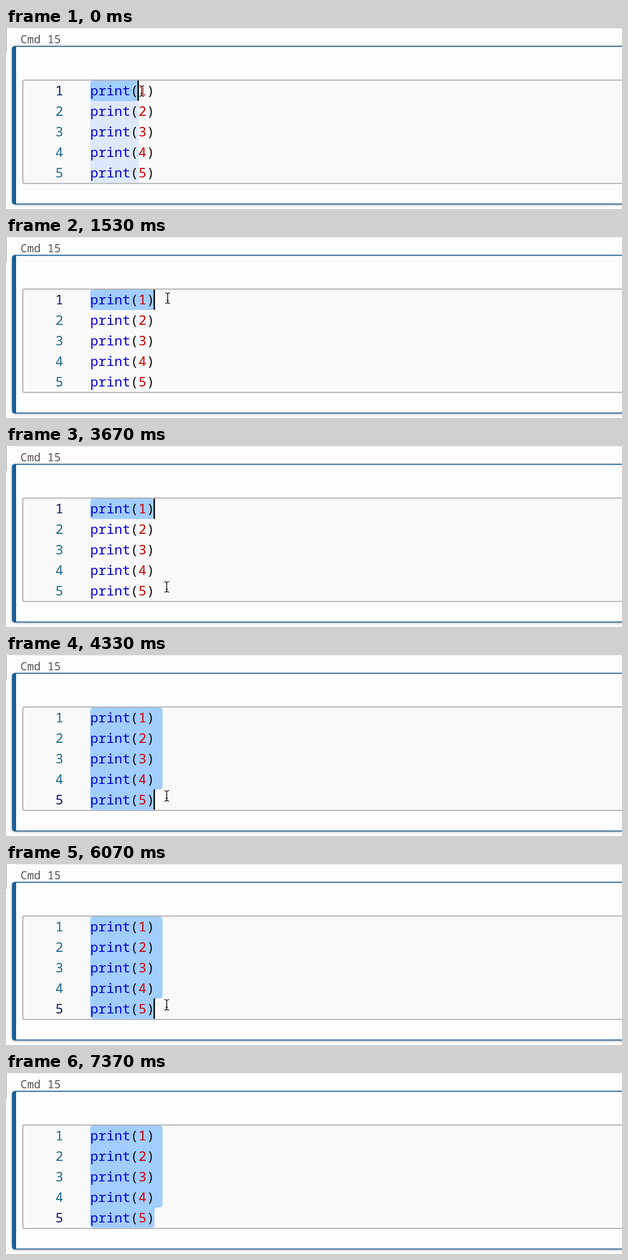
Write an HTML page with a canvas that moves like this. It is 1280 px wide and 379 px high and loops after 7410 ms.

```html
<!DOCTYPE html>
<html lang="en">
<head>
<meta charset="utf-8">
<title>Toggling comments in a notebook cell</title>
<style>
  html, body { margin: 0; width: 100%; height: 100%; overflow: hidden; background: #fdfdfd; }
  canvas { display: block; width: 1280px; height: 379px; }
</style>
</head>
<body>
<canvas id="stage" width="1280" height="379"></canvas>
<script>
const ctx = document.getElementById('stage').getContext('2d');
const LOOP = 7410;
const LEFT = 175, TOP = 110, ADVANCE = 16.7, ROW = 42.9;
const FAMILY = '"Noto Sans Mono", "DejaVu Sans Mono", monospace';
const COLOR = {
  page: '#fdfdfd', editor: '#f9f9f9', cell: '#175f98', border: '#a9a9a9',
  selection: '#a2cdff', match: '#dde9fb', name: '#0500dc', number: '#c80000',
  paren: '#111', comment: '#007d0b', line: '#20698a', activeLine: '#0b1a66'
};

// Moments at which the selection or the text changes.
const DRAGGED = 210, EXTENDED = 4200, COMMENTED = 4900, RESTORED = 5868;

// Pointer stops: time, x, y.
const STOPS = [
  [0, 282, 132], [20, 282, 132], [500, 336, 128], [2860, 336, 128],
  [3100, 348, 180], [3520, 334, 295], [6200, 334, 295], [6610, 1262, -18]
];

const colX = col => LEFT + col * ADVANCE;
const rowY = row => TOP + row * ROW;

// Font whose monospaced advance equals the given width.
function fontFor(advance) {
  ctx.font = '100px ' + FAMILY;
  return (advance * 100 / ctx.measureText('0').width).toFixed(2) + 'px ' + FAMILY;
}
const codeFont = fontFor(ADVANCE);
const labelFont = fontFor(14);

function text(str, x, y, color, font = codeFont) {
  ctx.font = font;
  ctx.fillStyle = color;
  ctx.fillText(str, x, y);
}

function rect(x, y, w, h, color) {
  ctx.fillStyle = color;
  ctx.fillRect(x, y, w, h);
}

function roundRect(x, y, w, h, r) {
  ctx.beginPath();
  ctx.roundRect(x, y, w, h, r);
}

function roundPoly(points, r) {
  const [first, last] = [points[0], points[points.length - 1]];
  ctx.beginPath();
  ctx.moveTo((first[0] + last[0]) / 2, (first[1] + last[1]) / 2);
  points.forEach((p, i) => {
    const next = points[(i + 1) % points.length];
    ctx.arcTo(...p, ...next, r);
  });
  ctx.closePath();
}

function pointerAt(t) {
  for (let i = 1; i < STOPS.length; i++) {
    const [t0, x0, y0] = STOPS[i - 1], [t1, x1, y1] = STOPS[i];
    if (t > t1) continue;
    const u = (t - t0) / (t1 - t0), e = u * u * (3 - 2 * u);
    return { x: x0 + (x1 - x0) * e, y: y0 + (y1 - y0) * e };
  }
  return null;
}

function stateAt(t, pointer) {
  const commented = t >= COMMENTED && t < RESTORED;
  const all = t >= EXTENDED;
  const dragX = t < 520 ? pointer.x : 336;
  const dragCol = Math.min(8, Math.round((dragX - LEFT) / ADVANCE));
  const lastEdit = [RESTORED, COMMENTED, EXTENDED, DRAGGED, 0].find(e => t >= e);
  return {
    commented, all,
    startCol: commented ? 2 : 0,
    endCol: commented ? 10 : all ? 8 : dragCol,
    activeRow: all ? 4 : 0,
    caretOn: (t - lastEdit) % 1000 < 500
  };
}

function drawChrome() {
  rect(0, 0, 1280, 379, COLOR.page);
  rect(20, 0, 1260, 1, '#e2e2e2');
  rect(0, 0, 1.5, 52, '#b0b0b0');
  text('Cmd 15', 30, 32, '#555', labelFont);

  ctx.save();
  ctx.shadowColor = 'rgba(0,0,0,.35)';
  ctx.shadowBlur = 5;
  ctx.shadowOffsetY = 1;
  ctx.fillStyle = COLOR.cell;
  roundRect(12.5, 37.5, 1300, 332, 6);
  ctx.fill();
  ctx.restore();
  rect(21, 39.5, 1259, 328, COLOR.page);

  ctx.fillStyle = COLOR.editor;
  ctx.strokeStyle = COLOR.border;
  ctx.lineWidth = 2;
  roundRect(35, 109, 1300, 216.4, 3);
  ctx.fill();
  ctx.stroke();
}

function drawSelection(s) {
  if (!s.all && s.endCol === 6) rect(LEFT, TOP, colX(6) - LEFT + 0.5, 214, COLOR.match);
  const start = colX(s.startCol), end = colX(s.endCol), wide = colX(s.endCol + 1);
  ctx.fillStyle = COLOR.selection;
  if (s.all) {
    roundPoly([
      [start, TOP], [wide, TOP], [wide, rowY(4)], [end, rowY(4)],
      [end, rowY(5)], [LEFT, rowY(5)], [LEFT, rowY(1)], [start, rowY(1)]
    ], 6);
  } else {
    roundRect(LEFT, TOP, end - LEFT, ROW, 6);
  }
  ctx.fill();
}

function drawCode(s) {
  for (let row = 0; row < 5; row++) {
    const y = rowY(row) + 31.3, n = row + 1;
    const put = (str, col, color) => text(str, colX(col), y, color);
    text(n, 102.5, y, row === s.activeRow ? COLOR.activeLine : COLOR.line);
    if (s.commented) {
      put('# print(' + n + ')', 0, COLOR.comment);
      if (row) {
        ctx.fillStyle = '#7fa6cf';
        ctx.beginPath();
        ctx.arc(colX(1.5), y - 9, 2.3, 0, 7);
        ctx.fill();
      }
    } else {
      put('print', 0, COLOR.name);
      put('(', 5, COLOR.paren);
      put(n, 6, COLOR.number);
      put(')', 7, COLOR.paren);
    }
  }
}

function drawPointer({ x, y }) {
  ctx.beginPath();
  for (const side of [-1, 1]) {
    ctx.moveTo(x - 5, y + side * 11);
    ctx.quadraticCurveTo(x, y + side * 11, x, y + side * 8);
    ctx.quadraticCurveTo(x, y + side * 11, x + 5, y + side * 11);
  }
  ctx.moveTo(x, y - 9);
  ctx.lineTo(x, y + 9);
  ctx.moveTo(x - 2.3, y + 5);
  ctx.lineTo(x + 2.3, y + 5);
  for (const [width, color] of [[4, '#fff'], [1.7, '#111']]) {
    ctx.lineWidth = width;
    ctx.strokeStyle = color;
    ctx.stroke();
  }
}

function draw(now) {
  const t = now % LOOP;
  const pointer = pointerAt(t);
  const state = stateAt(t, pointer);
  drawChrome();
  drawSelection(state);
  drawCode(state);
  if (state.caretOn) {
    rect(colX(state.endCol) - 2, rowY(state.activeRow), 2.9, ROW - 0.4, '#000');
  }
  if (pointer) drawPointer(pointer);
}

const began = performance.now();
function tick() {
  draw(performance.now() - began);
  requestAnimationFrame(tick);
}
tick();
</script>
</body>
</html>
```
